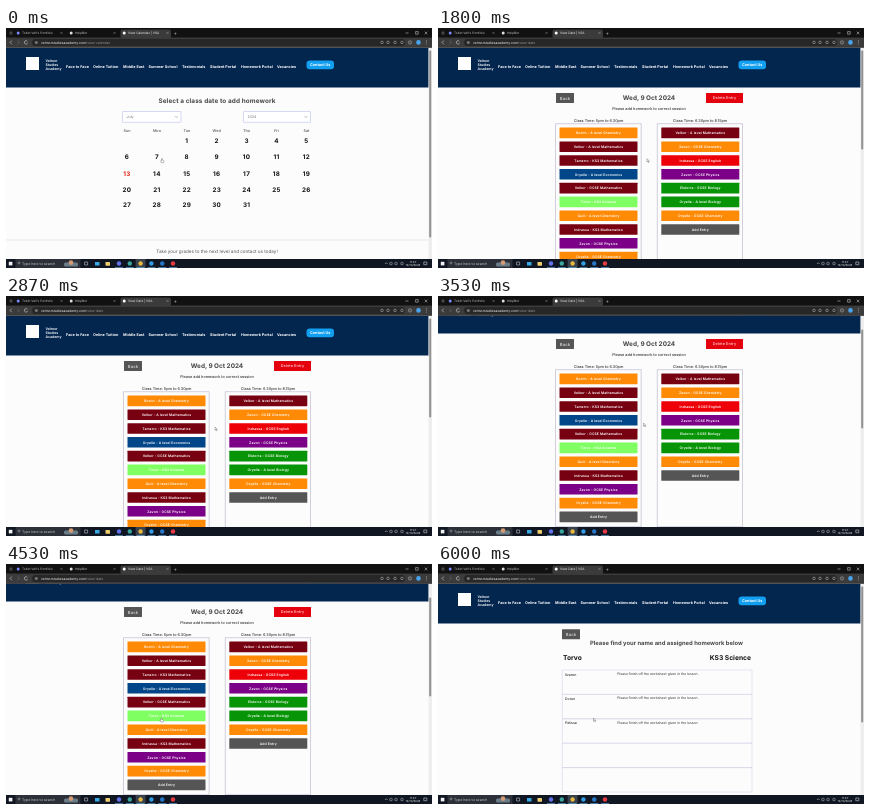
An HTML page with a canvas for the animation above (6.07 s loop, 426 by 240 pixels).

```html
<!DOCTYPE html>
<html lang="en">
<head>
<meta charset="utf-8">
<title>Homework portal</title>
<style>
html, body { margin: 0; width: 100%; height: 100%; overflow: hidden; background: #fcfcfd; }
canvas { display: block; width: 426px; height: 240px; }
</style>
</head>
<body>
<canvas id="stage"></canvas>
<script>
const W = 426, H = 240, LOOP = 6070, STEP = 1000 / 15;
const TOP = 19.5, BOTTOM = 231;
const canvas = document.getElementById('stage');
const scale = Math.max(1, window.devicePixelRatio || 1);
canvas.width = W * scale;
canvas.height = H * scale;
const ctx = canvas.getContext('2d');

const COLORS = {
  Chemistry: '#ff8a05', Mathematics: '#770011', Economics: '#004689', Science: '#80ff62',
  Physics: '#7b0087', Biology: '#079507', English: '#ee0008', Entry: '#555555'
};
const EARLY = [
  'Borrin - A level Chemistry', 'Velkor - A level Mathematics', 'Tamerro - KS3 Mathematics',
  'Oryelle - A level Economics', 'Velkor - GCSE Mathematics', 'Torvo - KS3 Science',
  'Quill - A level Chemistry', 'Indrassa - KS3 Mathematics', 'Zavon - GCSE Physics',
  'Oryelle - GCSE Chemistry', 'Add Entry'
];
const LATE = [
  'Velkor - A level Mathematics', 'Zavon - GCSE Chemistry', 'Indrassa - GCSE English',
  'Zavon - GCSE Physics', 'Elstorra - GCSE Biology', 'Oryelle - A level Biology',
  'Oryelle - GCSE Chemistry', 'Add Entry'
];
const PUPILS = ['Ilvaren', 'Dorun', 'Pelissa'];
const NAV = [
  ['Face to Face', 60], ['Online Tuition', 87], ['Middle East', 117], ['Summer School', 142.5],
  ['Testimonials', 176], ['Student Portal', 204], ['Homework Portal', 235], ['Vacancies', 271]
];

const clamp = v => Math.max(0, Math.min(1, v));
const progress = (t, a, b) => clamp((t - a) / (b - a));
const ease = p => p * p * (3 - 2 * p);
const mix = (a, b, p) => a + (b - a) * p;

function text(str, x, y, size, color, { weight = 400, align = 'left', spacing = 0 } = {}) {
  ctx.font = `${weight} ${size}px Inter, sans-serif`;
  ctx.textAlign = align;
  ctx.textBaseline = 'alphabetic';
  ctx.letterSpacing = spacing + 'px';
  ctx.textRendering = 'geometricPrecision';
  ctx.fillStyle = color;
  ctx.fillText(str, x, y + size * 0.36);
}

function rect(x, y, w, h, color, radius = 0) {
  ctx.fillStyle = color;
  ctx.beginPath();
  ctx.roundRect(x, y, w, h, radius);
  ctx.fill();
}

function outline(x, y, w, h, color, width = 0.6, radius = 0) {
  ctx.strokeStyle = color;
  ctx.lineWidth = width;
  ctx.beginPath();
  ctx.roundRect(x, y, w, h, radius);
  ctx.stroke();
}

function line(points, color, width = 0.6) {
  ctx.strokeStyle = color;
  ctx.lineWidth = width;
  ctx.beginPath();
  points.forEach(([x, y], i) => i ? ctx.lineTo(x, y) : ctx.moveTo(x, y));
  ctx.stroke();
}

function dot(x, y, r, color) {
  ctx.fillStyle = color;
  ctx.beginPath();
  ctx.arc(x, y, r, 0, 7);
  ctx.fill();
}

function button(label, x, y, w, h, color, size = 3.5, textColor = '#fff') {
  rect(x, y, w, h, color, 0.4);
  text(label, x + w / 2, y + h / 2, size, textColor, { weight: 600, align: 'center', spacing: 0.1 });
}

function header() {
  rect(0, TOP, W, 40, '#03264f');
  rect(20, 29, 13, 13, '#fff');
  ['Velmor', 'Studies', 'Academy'].forEach((word, i) =>
    text(word, 39.5, 32.4 + i * 4.3, 3.5, '#fff', { weight: 600 }));
  NAV.forEach(([label, x]) => text(label, x, 38.2, 3.75, '#fff', { weight: 700 }));
  rect(300.5, 32.6, 27.5, 8.6, '#139ff0', 3.2);
  text('Contact Us', 314.2, 36.9, 3.8, '#fff', { weight: 700, align: 'center' });
}

function dropdown(label, x, w) {
  rect(x, 83.5, w, 10.8, '#fff', 0.5);
  outline(x, 83.5, w, 10.8, '#b9bfec', 0.6, 0.5);
  text(label, x + 4, 89, 3.6, '#777');
  line([[x + w - 6, 88.2], [x + w - 4.6, 89.6], [x + w - 3.2, 88.2]], '#777', 0.5);
}

function calendarPage() {
  const center = { weight: 700, align: 'center' };
  text('Select a class date to add homework', 211, 72.5, 6.4, '#454545', { ...center, spacing: 0.1 });
  dropdown('July', 116.5, 58.5);
  dropdown('2024', 237.5, 67);
  const columnX = c => 121 + c * 29.9;
  'Sun Mon Tue Wed Thu Fri Sat'.split(' ').forEach((day, c) =>
    text(day, columnX(c), 102.7, 3.8, '#555', { align: 'center', weight: 500 }));
  const rowY = [112.8, 128.3, 146, 161.5, 177];
  for (let day = 1; day <= 31; day++) {
    const cell = day + 1;
    text(day, columnX(cell % 7), rowY[Math.floor(cell / 7)], 6.3,
      day === 13 ? '#e02012' : '#101010', { ...center, spacing: 0.3 });
  }
}

function footer() {
  line([[0, 212], [422, 212]], '#dcdce4', 0.6);
  text('Take your grades to the next level and contact us today!', 211, 223, 4.6, '#555', { align: 'center' });
}

function session(title, x, w, titleX, entries) {
  text(title, titleX, 92.3, 3.8, '#333', { align: 'center', weight: 500 });
  outline(x, 95.7, w, 157, '#b5b1c5', 0.6);
  entries.forEach((entry, i) =>
    button(entry, x + 4, 99.6 + i * 13.8, 78, 10.6, COLORS[entry.split(' ').pop()], 3.4));
}

function dayPage() {
  button('Back', 118, 65, 18, 10, '#555', 4.2, '#ccc');
  text('Wed, 9 Oct 2024', 211, 70, 6.4, '#454545', { weight: 700, align: 'center' });
  button('Delete Entry', 268, 65, 37, 10, '#e4000c', 3.8, '#ffc2c2');
  text('Please add homework to correct session', 211, 80.8, 3.8, '#333', { align: 'center', weight: 500 });
  session('Class Time: 5pm to 6.30pm', 117.5, 85.7, 160.5, EARLY);
  session('Class Time: 6.30pm to 8.15pm', 219.3, 85.2, 262, LATE);
}

function homeworkPage() {
  button('Back', 124, 65.3, 18, 10, '#555', 4.2, '#ccc');
  text('Please find your name and assigned homework below', 228.5, 79, 5.85, '#454545', { weight: 700, align: 'center' });
  text('Torvo', 125, 93.5, 6.7, '#111', { weight: 700 });
  text('KS3 Science', 313, 93.5, 6.7, '#111', { weight: 700, align: 'right' });
  for (let i = 0; i < 5; i++) {
    const y = 106 + i * 24.4;
    outline(124.3, y, 189.7, 24.4, '#cccde2', 0.5);
    if (!PUPILS[i]) continue;
    text(PUPILS[i], 127, y + 4.3, 3.5, '#333', { weight: 500 });
    text('Please finish off the worksheet given in the lesson.', 179.2, y + 3.6, 3.4, '#333');
  }
}

function scrollbar(length, offset) {
  rect(422.4, TOP, 3.6, BOTTOM - TOP, '#eeeeef');
  rect(423.2, TOP + 3 + offset, 2, length, '#929292', 1);
}

function tab(x, color, label, active) {
  if (active) rect(x - 2.5, 1.5, 50.5, 9, '#3b3b3b', 2);
  dot(x + 1.2, 5, 1.5, color);
  text(label, x + 5, 5, 3.2, active ? '#f0f0f0' : '#c4c4c4');
  const end = x + 44.5;
  line([[end - 0.8, 4.2], [end + 0.8, 5.8]], '#bbb', 0.4);
  line([[end + 0.8, 4.2], [end - 0.8, 5.8]], '#bbb', 0.4);
}

function browser(page) {
  rect(0, 0, W, TOP, '#111');
  rect(0, 9.5, W, 10, '#3b3b3b');
  dot(5, 5, 1.7, '#444');
  tab(11, '#7a8cff', "Tobin Vell's Portfolio", false);
  tab(64, '#ddd', 'HelpBot', false);
  tab(117, '#fff', page ? 'View Date | VSA' : 'View Calendar | VSA', true);
  text('+', 169.5, 5, 5, '#ccc', { align: 'center' });
  line([[399.5, 5], [402.5, 5]], '#ddd', 0.5);
  outline(409.6, 3.6, 2.6, 2.6, '#ddd', 0.5);
  line([[418.7, 3.7], [421.3, 6.3]], '#ddd', 0.5);
  line([[421.3, 3.7], [418.7, 6.3]], '#ddd', 0.5);

  line([[5.8, 12.6], [4, 14.4], [5.8, 16.2]], '#ddd', 0.6);
  line([[11.5, 12.6], [13.3, 14.4], [11.5, 16.2]], '#777', 0.6);
  ctx.strokeStyle = '#ddd';
  ctx.beginPath();
  ctx.arc(20, 14.4, 1.7, 0.4, 5.7);
  ctx.stroke();
  rect(26, 10.9, 373, 7.2, '#272727', 3.6);
  dot(30.3, 14.4, 1.5, '#777');
  const host = 'velmorstudiesacademy.com';
  text(host, 35, 14.4, 3.4, '#f2f2f2');
  const pathX = 35 + ctx.measureText(host).width;
  text(page ? '/view-date' : '/view-calendar', pathX, 14.4, 3.4, '#999');
  [376, 382, 389, 396].forEach(x => outline(x - 1.2, 13.2, 2.4, 2.4, '#ccc', 0.5, 1));
  outline(402.7, 13, 2.6, 2.8, '#ccc', 0.5, 0.6);
  dot(412.5, 14.4, 2.3, '#4aa3ed');
  [12.7, 14.4, 16.1].forEach(y => dot(420.5, y, 0.45, '#ddd'));
}

function taskbar() {
  rect(0, BOTTOM, W, H - BOTTOM, '#101722');
  rect(2.8, 233.8, 3.6, 3.6, '#f2f2f2');
  rect(9.5, BOTTOM, 65, 9, '#2b3039');
  outline(12, 234, 2, 2, '#ddd', 0.4, 1);
  text('Type here to search', 16, 235.6, 3.5, '#c8c8c8');
  rect(58, 234.5, 14, 4, '#6a7d88', 1.5);
  dot(65, 234.6, 2.3, '#d59b75');
  outline(78.6, 234, 3, 3, '#ddd', 0.5);
  rect(89, 234, 4.5, 3.5, '#3ba8e6');
  rect(99.5, 234, 4.5, 3.7, '#f0d070', 0.4);
  ['#6471ed', '#3aa6a0', '#e7b941', '#2f9de8', '#2677c7', '#e53a43'].forEach((color, i) => {
    const x = 113 + i * 10.8;
    if (i === 2) rect(x - 5, BOTTOM, 10, 9, '#39414c');
    dot(x, 235.5, 2.2, color);
    rect(x - 4, 239.4, 8, 0.6, '#76b9ed');
  });
  line([[379, 236], [380.3, 234.7], [381.6, 236]], '#ddd', 0.5);
  [385, 390, 396].forEach(x => outline(x - 1.2, 234.4, 2.4, 2.2, '#ddd', 0.45, 0.4));
  text('11:47', 407, 233.6, 2.8, '#eee', { align: 'center' });
  text('12/10/2024', 407, 237.4, 2.8, '#eee', { align: 'center' });
  outline(417.8, 234, 3, 2.7, '#eee', 0.5);
}

function cursorPosition(t) {
  if (t < 2000) return [mix(156, 209, ease(progress(t, 130, 740))), 130.7];
  const drift = ease(progress(t, 3130, 3480));
  const move = ease(progress(t, 3560, 4300));
  return [mix(mix(209, 205.5, drift), 155.5, move), mix(mix(131, 127, drift), 154, move)];
}

function cursor(t) {
  const [x, y] = cursorPosition(t);
  const hand = t < 1200 || (t > 4000 && t < 5100);
  ctx.save();
  ctx.translate(x, y);
  ctx.scale(0.8, 0.8);
  const shape = new Path2D(hand
    ? 'M-.6 0Q0-.7.6 0V1.8L2.2 2.3Q2.7 2.5 2.5 3.2L2 5H-.7L-1.9 3Q-1.8 2.2-.6 2.9Z'
    : 'M0 0V4.1L1 3.3 1.7 4.8 2.4 4.5 1.7 3H3Z');
  ctx.fillStyle = '#fff';
  ctx.strokeStyle = '#444';
  ctx.lineWidth = 0.45;
  ctx.fill(shape);
  ctx.stroke(shape);
  ctx.restore();
}

function faded(alpha, draw) {
  if (alpha <= 0) return;
  ctx.globalAlpha = alpha;
  draw();
  ctx.globalAlpha = 1;
}

function render(t) {
  ctx.setTransform(scale, 0, 0, scale, 0, 0);
  const page = t < 860 ? 0 : t < 4860 ? 1 : 2;
  const scroll = t < 5160 ? 22 * ease(progress(t, 3130, 3400)) : 0;
  const dayShown = t >= 1200 && t < 5160;
  rect(0, 0, W, H, '#fcfcfd');

  ctx.save();
  ctx.beginPath();
  ctx.rect(0, TOP, W, BOTTOM - TOP);
  ctx.clip();
  ctx.translate(0, -scroll);
  header();
  faded(1 - progress(t, 860, 1030), calendarPage);
  if (page === 0) footer();
  faded(progress(t, 1200, 1500) * (1 - progress(t, 4860, 5130)), dayPage);
  faded(progress(t, 5200, 5500), homeworkPage);
  ctx.restore();

  scrollbar(page === 0 ? 187 : dayShown ? 99 : 136, scroll * 0.5);
  browser(page);
  taskbar();
  cursor(t);
}

const start = performance.now();
function tick() {
  const t = (performance.now() - start) % LOOP;
  render(Math.floor((t + 4) / STEP) * STEP);
  requestAnimationFrame(tick);
}
tick();
</script>
</body>
</html>
```
